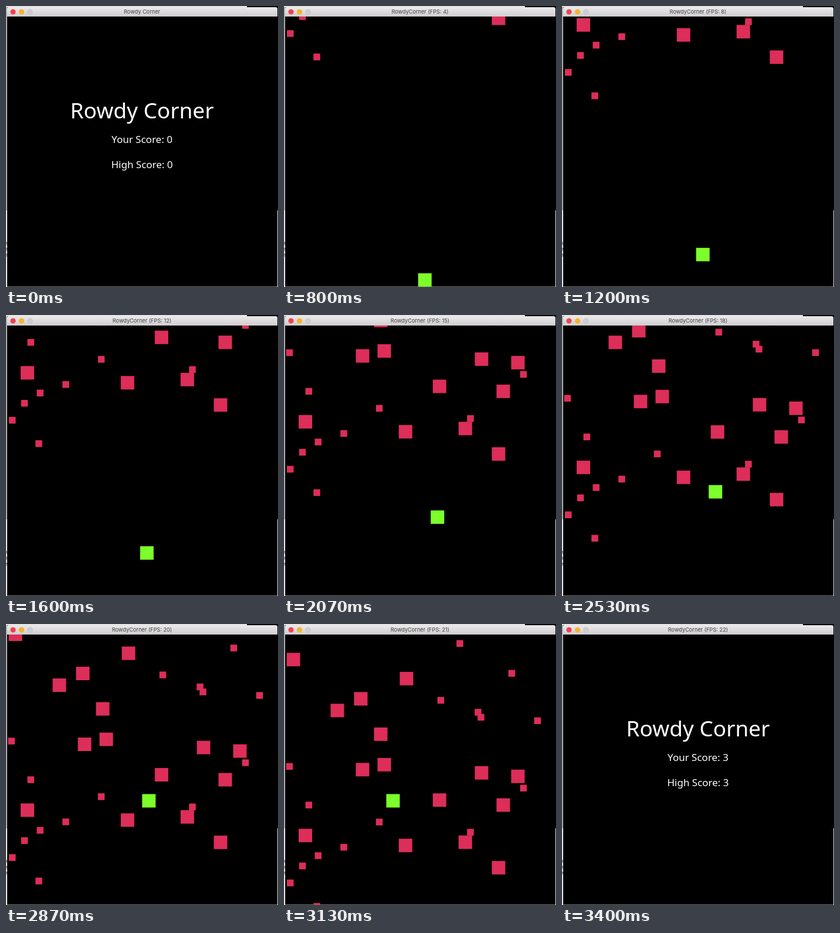
An HTML page for the animation above (3.99 s loop, 464 by 480 pixels).

```html
<!DOCTYPE html>
<html lang="en">
<head>
<meta charset="utf-8">
<title>Rowdy Corner</title>
<style>
  html, body { margin: 0; width: 100%; height: 100%; overflow: hidden; background: #000; }
  svg { display: block; width: 464px; height: 480px; }
  text { text-anchor: middle; }
  .bar { font: 9.2px Inter, Roboto, sans-serif; fill: #404040; }
  .menu { font: 17px "Noto Sans", "Open Sans", sans-serif; fill: #fff; }
  .menu .big { font-size: 37px; }
  .desk { font: 8px "DejaVu Sans Mono", monospace; fill: #222; }
</style>
</head>
<body>
<svg viewBox="0 0 464 480">
  <defs>
    <linearGradient id="chrome" x2="0" y2="1">
      <stop stop-color="#ebe9eb"/>
      <stop offset="1" stop-color="#cfcdcf"/>
    </linearGradient>
    <clipPath id="view"><path d="M2 18H463V479.5H2Z"/></clipPath>
  </defs>

  <!-- desktop behind the window -->
  <path fill="#000" d="M0 0H464V480H0Z"/>
  <path fill="#e4e4e4" d="M0 0H411V2H0Z"/>
  <path fill="#aaa" d="M0 2H2V349H0Z"/>
  <path fill="#e8e8e8" d="M0 349H464V480H0Z"/>
  <g class="desk">
    <text x="0" y="408">e</text>
    <text x="0" y="418">e</text>
    <text x="0" y="428">e</text>
  </g>

  <!-- window -->
  <path fill="#000" d="M2 17H463V479.5H2Z"/>
  <path fill="url(#chrome)" d="M1.5 18V5Q1.5 2 4.5 2H460Q463 2 463 5V18Z"/>
  <circle cx="12" cy="10" r="4.6" fill="#f0424f"/>
  <circle cx="26.5" cy="10" r="4.6" fill="#f6b32c"/>
  <circle cx="41" cy="10" r="4.4" fill="#cfcdcf" stroke="#bdbbbd" stroke-width=".5"/>
  <text id="caption" class="bar" x="232" y="13.4"></text>

  <g id="menu" class="menu">
    <text class="big" x="232" y="192">Rowdy Corner</text>
    <text id="score" x="232" y="234"></text>
    <text id="best" x="232" y="277"></text>
  </g>
  <g id="game" clip-path="url(#view)"></g>
</svg>
<script>
const LOOP = 3990, FPS = 15, START = 6, OVER = 51;
const STEP = 2.885;               // fall per game tick
const REF = 122;                  // tick at which the block places below hold
const BIG = 23, SMALL = 11.5;

// x, y pairs of block centres
const bigBlocks = [
  16, 17.5, 209, 50, 131, 84.5, 91, 104.5, 165, 145, 134, 205.5, 171, 197, 337, 211,
  399, 217, 265.3, 257.5, 374, 266, 36.5, 318, 207.3, 335, 309.3, 329.5, 366, 373, 450, -38
];
const smallBlocks = [
  388.5, 41, 267.5, 87, 331, 107.5, 336, 116, 432.5, 122, 9.3, 200, 408.5, 237, 42.3, 266,
  162.5, 295, 318, 312.5, 102, 338, 58.2, 352.5, 31.5, 370, 10.7, 399, 56, 439, 300, -10
];

// flat lists of frame, value
const ticks = [6, -24, 12, 0, 24, 46, 31, 75, 37, 101, 38, 102, 43, 122, 45, 129, 51, 153];
const playerX = [29, 240.3, 30.5, 261.8, 41.75, 261.8, 47, 186];
const playerY = [15, 468, 19.25, 406.5, 25, 406.5, 29.25, 345.3, 33, 345.3, 36, 302];

const $ = id => document.getElementById(id);

function along(points, k) {
  if (k <= points[0]) return points[1];
  for (let i = 2; i < points.length; i += 2) {
    if (k <= points[i]) {
      const [k0, v0, k1, v1] = points.slice(i - 2, i + 2);
      return v0 + (v1 - v0) * (k - k0) / (k1 - k0);
    }
  }
  return points[points.length - 1];
}

function square(size, fill) {
  const el = document.createElementNS("http://www.w3.org/2000/svg", "rect");
  el.setAttribute("width", size);
  el.setAttribute("height", size);
  el.setAttribute("fill", fill);
  $("game").append(el);
  return (x, y) => {
    el.setAttribute("x", x - size / 2);
    el.setAttribute("y", y - size / 2);
  };
}

const blocks = [];
function addBlocks(list, size) {
  for (let i = 0; i < list.length; i += 2)
    blocks.push({ x: list[i], y: list[i + 1], place: square(size, "#dc2e58") });
}
addBlocks(bigBlocks, BIG);
addBlocks(smallBlocks, SMALL);
const placePlayer = square(BIG, "#7cff2a");

function draw(k) {
  const playing = k >= START && k < OVER;
  const score = k < START ? 0 : 3;
  const sec = k / FPS;
  const rate = Math.min(22, Math.floor(60 * (sec - 0.4) / (sec + 4.4) + 1e-6));
  $("caption").textContent = k < START ? "Rowdy Corner" : `RowdyCorner (FPS: ${rate})`;
  $("score").textContent = "Your Score: " + score;
  $("best").textContent = "High Score: " + score;
  $("menu").style.display = playing ? "none" : "";
  $("game").style.display = playing ? "" : "none";
  const fall = (Math.round(along(ticks, k)) - REF) * STEP;
  for (const b of blocks) b.place(b.x, b.y + fall);
  placePlayer(along(playerX, k), along(playerY, k));
}

let last = -1;
function tick() {
  const t = performance.now() % LOOP;
  // picture changes on a 15 fps grid rounded to 10 ms
  const k = Math.floor((Math.floor(t / 10) * 10 + 4) * FPS / 1000);
  if (k !== last) draw(last = k);
  requestAnimationFrame(tick);
}
tick();
</script>
</body>
</html>
```
